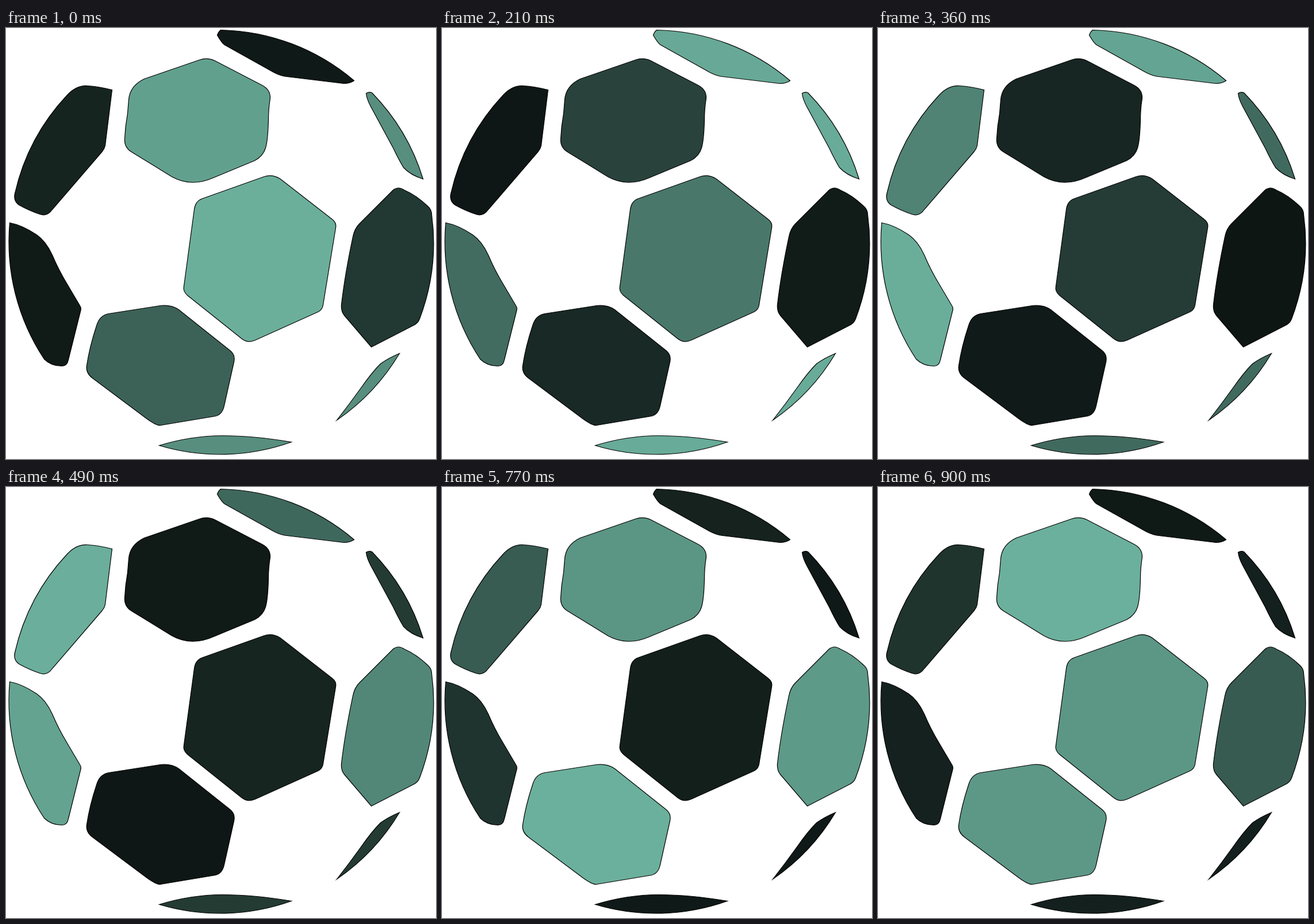
Animation of 748 by 749 pixels, one loop 970 ms. Source, as an HTML page with a canvas:

```html
<!DOCTYPE html>
<html lang="en">
<head>
<meta charset="utf-8">
<title>Ball loader</title>
<style>
  html, body { margin: 0; width: 100%; height: 100%; overflow: hidden; background: #fff; }
  canvas { display: block; }
</style>
</head>
<body>
<canvas id="stage" width="748" height="749"></canvas>
<script>
const ctx = document.getElementById('stage').getContext('2d');

const LOOP = 970;
const PULSE = 1000;
const STEPS = [0, 70, 140, 210, 280, 360, 430, 490, 560, 630, 700, 770, 840, 900];
const DARK = [13, 21, 19];
const LIGHT = [108, 177, 157];
const RIM = 'A369 369 0 0 1 ';

// Patches in the order the pulse reaches them; each group lags by 1/8 of a pulse.
const groups = [
  [
    `M636 112${RIM}725 262Q703 255 691 242Q683 229 673 208L634 136Q627 123 626 113Q631 110 636 112Z`,
    `M684 565${RIM}575 681Q597 653 617 625Q636 598 651 583Q665 573 684 565Z`,
    `M496 719${RIM}266 725Q322 708 376 708Q430 708 496 719Z`
  ],
  [`M373 3${RIM}605 91Q598 96 587 96L488 84Q478 83 466 77L380 29Q375 26 367 12Q369 6 373 3Z`],
  [`M6 338Q28 342 53 359Q69 370 80 394Q91 420 105 443L128 482Q131 486 129 492L108 576Q106 587 97 587Q78 587 66 575${RIM}6 338Z`],
  [`M184 107L172 204Q171 209 167 214L80 315Q71 328 58 323Q40 317 22 307Q12 300 15 287${RIM}106 116Q122 99 141 100Q160 101 184 107Z`],
  [`M673 281Q682 274 692 281Q713 290 733 309Q740 315 740 324${RIM}719 505Q716 513 707 517L635 554L588 499Q582 492 583 480Q589 428 603 362Q606 348 614 340Z`],
  ['M178 496L268 482Q287 480 300 489L388 559Q399 567 396 580L379 656Q376 671 364 674L268 690Q262 691 245 679L150 608Q138 599 140 586Q145 553 157 517Q162 499 178 496Z'],
  ['M336 55Q350 50 364 57L445 99Q460 107 459 122Q456 140 456 160Q455 195 451 208Q447 222 432 230L362 259Q322 277 288 258L254 237L218 215Q205 207 206 192Q207 170 211 148L213 124Q215 100 240 88Z'],
  ['M448 258Q463 253 477 262L567 332Q575 338 573 347L551 481Q550 489 542 493L433 542Q420 548 409 539L315 464Q307 457 309 448L327 315Q329 300 341 296Z']
].map(paths => paths.map(d => new Path2D(d)));

// Pulse shape: [phase in ms, green level]
const curve = [
  [0, 142], [25, 151], [60, 164], [110, 174], [145, 176], [210, 171],
  [250, 160], [275, 152], [335, 120], [375, 98], [400, 91], [460, 67],
  [500, 56], [585, 41], [650, 33], [740, 26], [860, 22], [880, 26],
  [900, 32], [930, 70], [960, 108], [985, 131], [1000, 142]
];

function level(phase) {
  const i = curve.findIndex(([p]) => p > phase);
  const [p0, v0] = curve[i - 1], [p1, v1] = curve[i];
  return v0 + (v1 - v0) * (phase - p0) / (p1 - p0);
}

function color(phase) {
  const mix = (level(phase) - DARK[1]) / (LIGHT[1] - DARK[1]);
  return `rgb(${DARK.map((d, i) => Math.round(d + (LIGHT[i] - d) * mix))})`;
}

function draw(now) {
  const t = now % LOOP;
  const step = STEPS.filter(s => s <= t).pop();
  ctx.setTransform(1, 0, 0, 1, 0, 0);
  ctx.fillStyle = '#fff';
  ctx.fillRect(0, 0, 748, 749);
  ctx.translate(0.5, 0.5);
  ctx.strokeStyle = '#000';
  ctx.lineWidth = 1.2;
  groups.forEach((paths, g) => {
    ctx.fillStyle = color((step - g * PULSE / 8 + PULSE) % PULSE);
    for (const path of paths) {
      ctx.fill(path);
      ctx.stroke(path);
    }
  });
}

let start;
function tick(now) {
  start ??= now;
  draw(now - start);
  requestAnimationFrame(tick);
}
draw(0);
requestAnimationFrame(tick);
</script>
</body>
</html>
```
